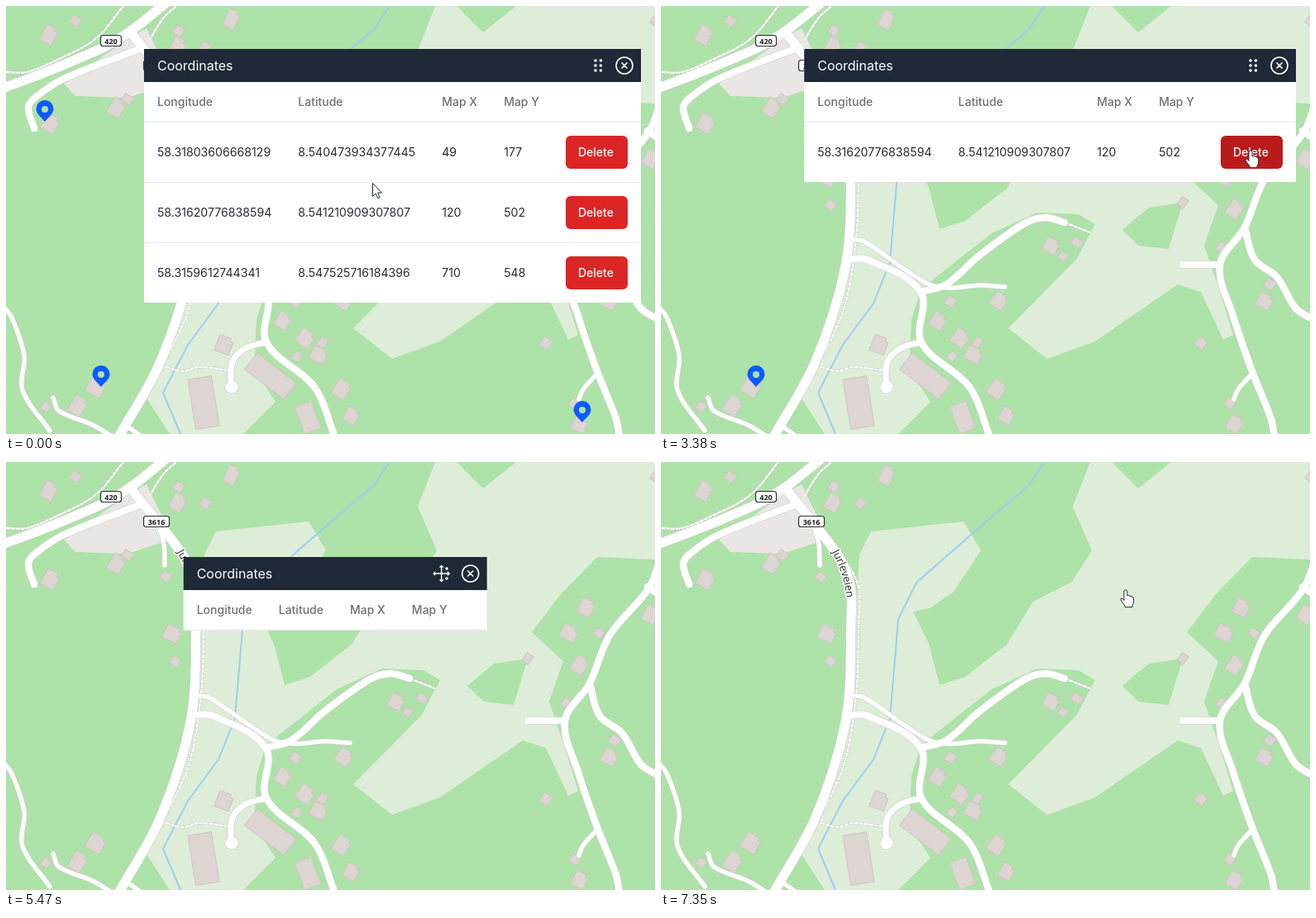
Recreate the animation shown at these times as an HTML page with a canvas. Size 785 px wide and 518 px high, loop 8660 ms.

```html
<!DOCTYPE html>
<html lang="en">
<head>
<meta charset="utf-8">
<title>Coordinates</title>
<style>
html, body { margin: 0; width: 100%; height: 100%; overflow: hidden; background: #ade2a8; }
canvas { display: block; }
</style>
</head>
<body>
<canvas id="stage" width="785" height="518"></canvas>
<script>
const W = 785, H = 518, LOOP = 8660;
const stage = document.getElementById('stage').getContext('2d');

const points = s => s.split(' ').map(p => p.split(',').map(Number));

let seed = 7;
const random = () => (seed = seed * 16807 % 2147483647) / 2147483647;

// ---------- map ----------
const GREEN = '#ade2a8', EDGE = '#d3dad0';

const meadow = '519,0 498,54 521,107 497,145 450,169 418,221 368,260 337,270 324,220 305,181 ' +
  '325,177 354,157 387,107 366,72 254,84 240,112 228,310 170,475 198,518 287,518 326,479 300,440 ' +
  '303,380 314,343 400,275 455,250 505,252 525,264 503,306 420,390 467,427 525,406 ' +
  '625,337 653,346 680,404 692,398 676,345 657,290 674,241 636,206 672,159 715,115 785,118 785,0 ' +
  '617,0 577,32 545,0';
const grove = '558,271 590,244 631,238 614,294 578,290';
const yard = '70,94 150,38 170,27 192,72 190,97 147,111 84,109';
const river = '464,0 445,28 375,88 309,146 287,190 277,310 257,360 220,410 190,468 211,518';

const footpaths = [
  '0,80 25,80 60,66 108,40 142,0',
  '173,42 190,15 206,0',
  '196,84 237,145 239,200 235,290 217,378 148,508',
  '488,262 519,274',
  '193,437 215,442 232,437 270,441'
];

// Roads grouped by width.
const roads = {
  11: ['-8,101 48,80 118,50 150,31 194,-4', '150,31 214,113 229,150 230,190 224,310 187,430 136,522'],
  8: [
    '164,51 70,88 34,112 27,124 34,148',
    '228,306 250,307 314,346 315,407 373,461 398,522',
    '314,346 345,337 385,302 440,263 465,256 488,262',
    '794,108 778,152 730,210 706,268 676,314 692,375 715,442 738,500 742,522',
    '776,151 792,162',
    '706,268 718,307 745,328 768,366 792,381',
    '631,313 676,313'
  ],
  7: ['315,407 292,413 274,430 272,458'],
  5: [
    '234,283 246,285 322,336 350,341 385,338 416,340',
    '192,125 191,100 185,78',
    '-3,364 7,377 22,423 20,465 53,514',
    '57,474 64,490 105,507 128,521',
    '143,506 164,521',
    '715,445 698,464 693,476'
  ]
};

const homes = '273,16 208,49 134,123 54,142 201,208 264,410 362,402 378,422 109,461 87,484 335,381 ' +
  '472,290 409,357 406,464 418,496 702,176 681,207 694,246 730,357 694,506 780,185 52,35';
const huts = '84,18 209,30 241,50 147,113 193,139 205,241 48,485 350,358 383,407 352,424 486,303 503,286 ' +
  '717,207 678,292 631,238 736,337 653,408 688,481 785,18';

function trace(c, pts) {
  c.beginPath();
  pts.forEach(p => c.lineTo(...p));
}

// Smooth curve through every point.
function spline(c, pts) {
  c.beginPath();
  c.moveTo(...pts[0]);
  for (let i = 0; i < pts.length - 1; i++) {
    const a = pts[i], b = pts[i + 1], before = pts[i - 1] || a, after = pts[i + 2] || b;
    const span = Math.hypot(b[0] - a[0], b[1] - a[1]);
    const handle = (p, q, sign) => {
      const len = Math.hypot(q[0] - p[0], q[1] - p[1]);
      return [0, 1].map(k => sign * (q[k] - p[k]) / len * span / 3);
    };
    const h = handle(before, b, 1), g = handle(a, after, -1);
    c.bezierCurveTo(a[0] + h[0], a[1] + h[1], b[0] + g[0], b[1] + g[1], ...b);
  }
}

function area(c, s, color) {
  trace(c, points(s));
  c.fillStyle = color;
  c.fill();
}

function line(c, width, color) {
  c.lineWidth = width;
  c.strokeStyle = color;
  c.stroke();
}

function disc(c, x, y, r, color) {
  c.beginPath();
  c.arc(x, y, r, 0, 7);
  c.fillStyle = color;
  c.fill();
}

function house(c, x, y, w, h, angle, notch = 0) {
  c.save();
  c.translate(x, y);
  c.rotate(angle);
  const r = w / 2, b = h / 2;
  trace(c, [[-r, -b], [r - notch, -b], [r - notch, notch - b], [r, notch - b], [r, b], [-r, b]]);
  c.closePath();
  c.fillStyle = '#dcd5d1';
  c.fill();
  line(c, 1, '#cfc6c2');
  c.restore();
}

function village(c) {
  for (const [x, y] of points(homes)) house(c, x, y, 15 + 5 * random(), 17 + 5 * random(), .35 + .25 * random(), 4);
  for (const [x, y] of points(huts)) house(c, x, y, 9 + 3 * random(), 9 + 3 * random(), .6);
  house(c, 320, 448, 60, 25, .66);
  house(c, 239, 480, 29, 61, -.16);
  house(c, 365, 498, 21, 35, -.35);
}

function badge(c, x, y, w, text) {
  c.beginPath();
  c.roundRect(x, y, w, 13, 3);
  c.fillStyle = '#fff';
  c.fill();
  line(c, 1.2, '#2b3038');
  c.font = 'bold 9px "Noto Sans", sans-serif';
  c.fillStyle = '#222';
  c.textAlign = 'center';
  c.fillText(text, x + w / 2, y + 10);
  c.textAlign = 'left';
}

function streetName(c, text) {
  c.font = '13px "Noto Sans", sans-serif';
  c.textBaseline = 'middle';
  c.lineWidth = 3;
  c.strokeStyle = '#fff';
  c.fillStyle = '#33373a';
  const total = c.measureText(text).width;
  for (const pass of ['strokeText', 'fillText']) {
    let run = 0;
    c.save();
    c.translate(210, 107);
    c.rotate(1.08);
    for (const ch of text) {
      const w = c.measureText(ch).width;
      c[pass](ch, 0, 0);
      c.translate(w, 0);
      c.rotate(.4 * w / total);
    }
    c.restore();
  }
  c.textBaseline = 'alphabetic';
}

function buildMap() {
  const canvas = document.createElement('canvas');
  canvas.width = W;
  canvas.height = H;
  const c = canvas.getContext('2d');
  c.fillStyle = GREEN;
  c.fillRect(0, 0, W, H);
  area(c, meadow, '#ddedd8');
  area(c, grove, GREEN);
  area(c, yard, '#e9e6e4');
  c.lineJoin = 'round';
  trace(c, points(river));
  line(c, 2, '#9bcdf3');
  village(c);
  for (const p of footpaths) {
    spline(c, points(p));
    line(c, 3.2, '#ccd2ca');
    c.setLineDash([5, 1]);
    line(c, 2, '#fff');
    c.setLineDash([]);
  }
  c.lineCap = 'round';
  for (const [extra, color] of [[1.6, EDGE], [0, '#fff']]) {
    for (const width in roads) {
      for (const p of roads[width]) {
        spline(c, points(p));
        line(c, +width + extra, color);
      }
    }
    disc(c, 273, 461, 7.6 + extra / 2, color);
  }
  badge(c, 114.5, 35.5, 25, '420');
  badge(c, 166.5, 65.5, 31, '3616');
  streetName(c, 'Jurleveien');
  return canvas;
}

// ---------- motion ----------
// The pointer is caught in short bursts: start, end, number of steps, way points.
const cursorMoves = [
  [90, 460, 6, '443,214 706,174'],
  [1610, 2010, 6, '706,174 704,259'],
  [3080, 3380, 5, '704,259 713,174'],
  [4430, 4600, 3, '713,174 712,74'],
  [4750, 4750, 1, '712,74 713,71'],
  [6540, 6620, 2, '517,149 571,152'],
  [6770, 6930, 3, '571,152 562,154']
];
const drags = [
  [5000, 5860, 12, '401,52 324,48 240,80 164,185 161,227'],
  [5930, 6470, 8, '161,227 131,128 129,106 165,112 205.5,129']
];
const GRIP = [312, 20], CLOSED = 7350;

const smooth = u => u * u * (3 - 2 * u);

function place(moves, t, ease = u => u) {
  const [from, to, count, way] = moves.filter(m => t >= m[0]).pop() || moves[0];
  const pts = points(way);
  if (t < from) return pts[0];
  const gap = (to - from) / (count - 1) || 1;
  const step = Math.min(count, Math.floor((t - from + 10) / gap) + 1);
  const pos = ease(step / count) * (pts.length - 1);
  const i = Math.min(Math.floor(pos), pts.length - 2);
  return [0, 1].map(k => pts[i][k] + (pts[i + 1][k] - pts[i][k]) * (pos - i));
}

function cursorAt(t) {
  if (t < drags[0][0] || t >= 6540) return place(cursorMoves, t, smooth);
  return place(drags, t).map((v, k) => v + GRIP[k]);
}

// ---------- panel ----------
const TITLE = '400 16px Inter, sans-serif';
const HEAD = '500 14px Inter, sans-serif';
const CELL = '400 14.15px Inter, sans-serif';
const PAD = 16, BAR = 40, HEAD_H = 48, ROW_H = 73, RIGHT = 768;

const heads = ['Longitude', 'Latitude', 'Map X', 'Map Y'];
const rows = [
  { until: 1130, pin: [47, 125], cells: ['58.31803606668129', '8.540473934377445', '49', '177'] },
  { until: 4200, pin: [115, 446], cells: ['58.31620776838594', '8.541210909307807', '120', '502'] },
  { until: 2750, pin: [697, 489], cells: ['58.3159612744341', '8.547525716184396', '710', '548'] }
];

function textWidth(text, font) {
  stage.font = font;
  return stage.measureText(text).width;
}

function label(text, x, y, font, color) {
  stage.font = font;
  stage.fillStyle = color;
  stage.fillText(text, x, y);
}

function box(x, y, w, h, color) {
  stage.fillStyle = color;
  stage.fillRect(x, y, w, h);
}

// Columns are as wide as their longest text, and the panel hangs from its right edge.
function panelAt(t) {
  const list = rows.filter(r => t < r.until);
  const cols = [];
  let w = 0;
  heads.forEach((head, i) => {
    cols.push(w + PAD);
    w += 2 * PAD + Math.max(textWidth(head, HEAD), ...list.map(r => textWidth(r.cells[i], CELL)));
  });
  w += 2 * PAD + (list.length ? 75 : 0);
  const [x, y] = list.length ? [RIGHT - w, 52] : place(drags, t);
  const h = BAR + HEAD_H + (ROW_H * list.length || 1);
  return { list, cols, x, y, w, h };
}

const rowMiddle = (p, i) => p.y + BAR + HEAD_H + ROW_H * (i + .5) + .5;

const onButton = (p, i, [cx, cy]) =>
  Math.abs(cx - (p.x + p.w - 53.5)) < 37.5 && Math.abs(cy - rowMiddle(p, i)) < 20;

function drawPanel(p, cursor) {
  const { x, y, w, h, cols, list } = p, right = x + w;
  box(x, y, w, h, '#fff');
  box(x, y, w, BAR, '#1f2937');
  label('Coordinates', x + PAD, y + 26, TITLE, '#fff');
  for (let i = 0; i < 6; i++) disc(stage, right - 55 + i % 2 * 6.4, y + 14 + (i >> 1) * 6, 1.8, '#fff');
  const cx = right - 20, cy = y + 20, arm = 3.5;
  stage.beginPath();
  stage.arc(cx, cy, 10, 0, 7);
  for (const s of [-arm, arm]) {
    stage.moveTo(cx - arm, cy - s);
    stage.lineTo(cx + arm, cy + s);
  }
  line(stage, 1.6, '#fff');

  heads.forEach((s, i) => label(s, x + cols[i], y + 69, HEAD, '#6c7177'));
  box(x, y + BAR + HEAD_H, w, 1, '#e5e7eb');
  list.forEach((row, i) => {
    const mid = rowMiddle(p, i);
    row.cells.forEach((s, j) => label(s, x + cols[j], mid + 5, CELL, '#262b33'));
    stage.beginPath();
    stage.roundRect(right - 91, mid - 20, 75, 40, 6);
    stage.fillStyle = onButton(p, i, cursor) ? '#b91c1c' : '#dc2626';
    stage.fill();
    label('Delete', right - 76, mid + 5, HEAD, '#fff');
    if (i < list.length - 1) box(x, mid + 36, w, 1, '#e5e7eb');
  });
}

// ---------- pins and cursor ----------
const pinShape = new Path2D('M0,15C-4.5,9 -10.5,6 -10.5,-.5A10.5,10.5 0 0 1 10.5,-.5C10.5,6 4.5,9 0,15Z' +
  'M4,0A4,4 0 0 1 -4,0A4,4 0 0 1 4,0Z');
const cursors = {
  arrow: new Path2D('M.5,.5V16.5L4.2,13L6.7,18.8L9.2,17.7L6.7,12H11.5Z'),
  hand: new Path2D('M-2,2Q0,-1 2,2V8Q4,6 5,8.5Q7,7 7.7,9.5Q9.7,9 9.7,12V15.5Q9.4,18 8,19.5V21.7H-1V19.5' +
    'Q-4.5,16 -6,12.5Q-5.8,9.8 -3.6,11.5L-2,13.5Z'),
  move: new Path2D('M0,-11L4,-7H1.2V-1.2H7V-4L11,0L7,4V1.2H1.2V7H4L0,11L-4,7H-1.2V1.2H-7V4L-11,0' +
    'L-7,-4V-1.2H-1.2V-7H-4Z')
};

function cursorKind(p, cursor, open) {
  const dx = cursor[0] - p.x, dy = cursor[1] - p.y;
  if (!open || dx < 0 || dy < 0 || dx > p.w || dy > p.h) return 'hand';
  if (dy < BAR && dx > p.w - 38) return 'hand';
  if (dy < BAR && dx > p.w - 68) return 'move';
  return p.list.some((r, i) => onButton(p, i, cursor)) ? 'hand' : 'arrow';
}

function shape(path, [x, y], fill, outline) {
  stage.save();
  stage.translate(x, y);
  stage.fillStyle = fill;
  stage.fill(path, 'evenodd');
  if (outline) {
    stage.lineWidth = 1;
    stage.lineJoin = 'round';
    stage.strokeStyle = outline;
    stage.stroke(path);
  }
  stage.restore();
}

const map = buildMap();

function draw(t) {
  const open = t < CLOSED, cursor = cursorAt(t), panel = panelAt(t);
  stage.drawImage(map, 0, 0);
  panel.list.forEach(r => shape(pinShape, r.pin, '#0d5bff'));
  if (open) drawPanel(panel, cursor);
  shape(cursors[cursorKind(panel, cursor, open)], cursor, '#fff', '#1f2937');
}

const start = performance.now();
function tick() {
  draw((performance.now() - start) % LOOP);
  requestAnimationFrame(tick);
}
tick();
</script>
</body>
</html>
```
